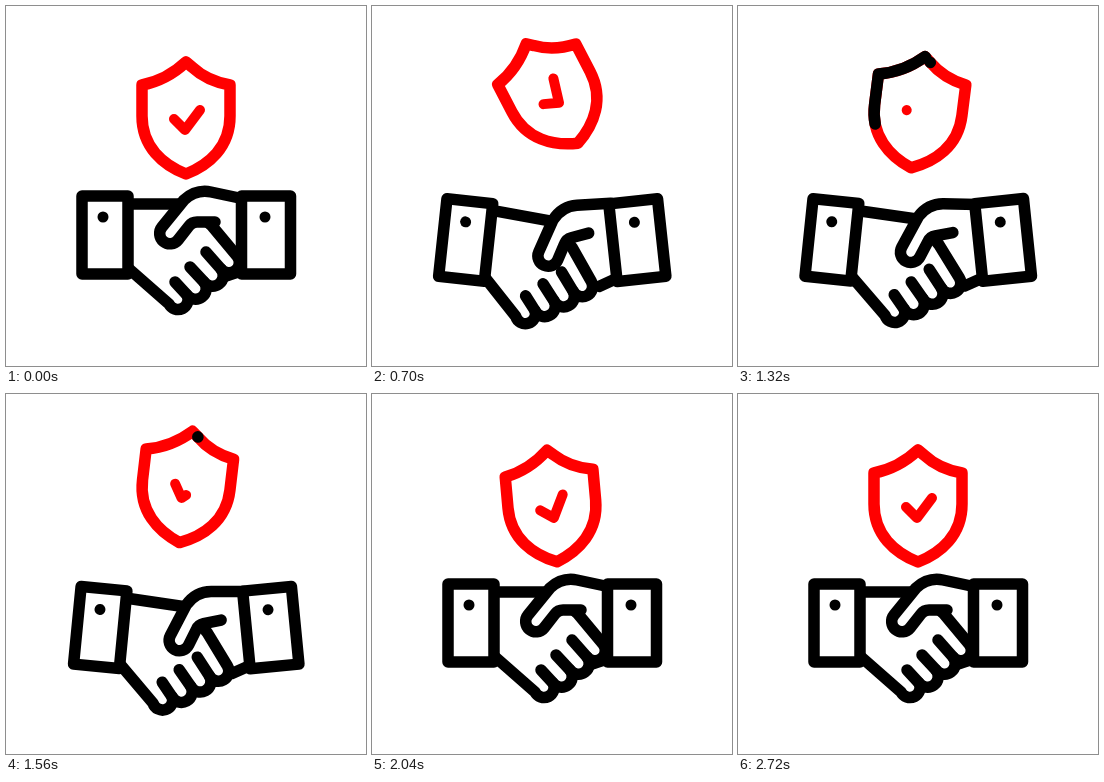
These frames come from a looping animation (360 px wide and 360 px high, 2820 ms). An HTML page:

```html
<!DOCTYPE html>
<html lang="en">
<head>
<meta charset="utf-8">
<title>Handshake</title>
<style>
  html, body { margin: 0; width: 100%; height: 100%; overflow: hidden; background: #fff; }
  svg { display: block; width: 100vw; height: 100vh; }
  path, rect { stroke-width: 11.5; stroke-linecap: round; stroke-linejoin: round; }
  .ink { stroke: #000; fill: #fff; }
  .red { stroke: #f00; fill: none; }
  .line { fill: none; }
  .edge { stroke: none; fill: #fff; }
</style>
</head>
<body>
<svg viewBox="0 0 360 360">
  <g class="right">
    <path class="ink line" d="M217 271L238 264"/>
  </g>
  <g class="left">
    <g id="leftHand">
      <path class="ink" d="M122 198H182L206 220L231 250A10 10 0 0 1 215 263A10 10 0 0 1 198 276A10 10 0 0 1 181 289A10 10 0 0 1 163 298L122 262"/>
      <path class="ink line" d="M169 276L181 289M184 261L198 276M200 246L215 263"/>
    </g>
    <rect class="ink" x="76" y="190" width="46" height="78"/>
    <circle cx="97" cy="211" r="5.5"/>
  </g>
  <g class="right">
    <g id="rightHand">
      <path class="edge" d="M238 193L205 186Q190 183 178 194L156 221A10 10 0 0 0 172 234L183 220Q186 216 191 216H238Z"/>
      <path class="ink line" d="M238 193L205 186Q190 183 178 194L156 221A10 10 0 0 0 172 234L183 220Q186 216 191 216H209"/>
    </g>
    <rect class="ink" x="235.5" y="190" width="49" height="78"/>
    <circle cx="259" cy="211" r="5.5"/>
  </g>
  <g id="shield">
    <path class="red" d="M6 -51Q21 -37 44 -33V-2C44 29 23 47 0 56C-23 47 -44 29 -44 -2V-33Q-19 -38 0 -56Z"/>
    <path id="runner" class="ink line" pathLength="1" d="M6 -51Q21 -37 44 -33V-2C44 29 23 47 0 56C-23 47 -44 29 -44 -2V-33Q-19 -38 0 -56Z"/>
  </g>
  <path id="check" class="red" pathLength="1" style="stroke-width:10" d="M-12 -1L-1 10L14 -10"/>
</svg>
<script>
  const LOOP = 2820, REST = 2720, STEP = 20;
  const find = id => document.getElementById(id);
  const shield = find('shield'), runner = find('runner'), check = find('check');
  const leftHand = find('leftHand'), rightHand = find('rightHand');
  const lefts = document.querySelectorAll('.left');
  const rights = document.querySelectorAll('.right');

  // Each track is a list of [time, value], eased in and out between keys.
  const tracks = {
    shake: [[0, 0], [600, 7.1], [1020, 0], [1430, 7.1], [1850, 0]],
    bend: [[290, 0], [690, 9], [1060, 0], [1480, 7], [1850, 0]],
    lift: [[0, 0], [600, -28.5], [1100, 14.5], [1500, -20.5], [1850, 0]],
    tilt: [[80, 0], [720, -27.5], [1420, 9], [1950, -5.1]],
    checkTilt: [[150, 0], [720, -50], [1480, 23], [2000, -16]],
    checkLength: [[960, 1], [1330, 0], [1780, 1]],
    runnerHead: [[720, 0], [1380, 1]],
    runnerTail: [[940, 0], [1570, 1]]
  };

  function at(name, t) {
    const keys = tracks[name];
    if (t <= keys[0][0]) return keys[0][1];
    for (let i = 1; i < keys.length; i++) {
      const [t0, a] = keys[i - 1], [t1, b] = keys[i];
      if (t < t1) return a + (b - a) * (1 - Math.cos(Math.PI * (t - t0) / (t1 - t0))) / 2;
    }
    return keys[keys.length - 1][1];
  }

  const place = (el, value) => el.setAttribute('transform', value);

  function trim(el, start, end, visible) {
    el.setAttribute('stroke-dasharray', `0 ${start} ${Math.max(end - start, 0.0001)} 2`);
    el.setAttribute('visibility', visible ? 'visible' : 'hidden');
  }

  function draw(now) {
    let t = Math.floor((now % LOOP) / STEP) * STEP;
    if (t >= REST) t = 0;

    // The arms swing from the elbows; the hands follow late from the wrists.
    const shake = at('shake', t), bend = at('bend', t), y = 112 + at('lift', t);
    lefts.forEach(el => place(el, `rotate(${shake} 50 182)`));
    rights.forEach(el => place(el, `rotate(${-shake} 310 182)`));
    place(leftHand, `rotate(${bend * 0.47} 138 217)`);
    place(rightHand, `rotate(${-bend} 216 195)`);
    place(shield, `translate(180 ${y}) rotate(${at('tilt', t)})`);
    place(check, `translate(180 ${y + 2}) rotate(${at('checkTilt', t)})`);

    const length = at('checkLength', t);
    trim(check, 0, length, length > 0);
    trim(runner, at('runnerTail', t), at('runnerHead', t), t > 720 && t < 1570);
    requestAnimationFrame(draw);
  }

  draw(0);
</script>
</body>
</html>
```
